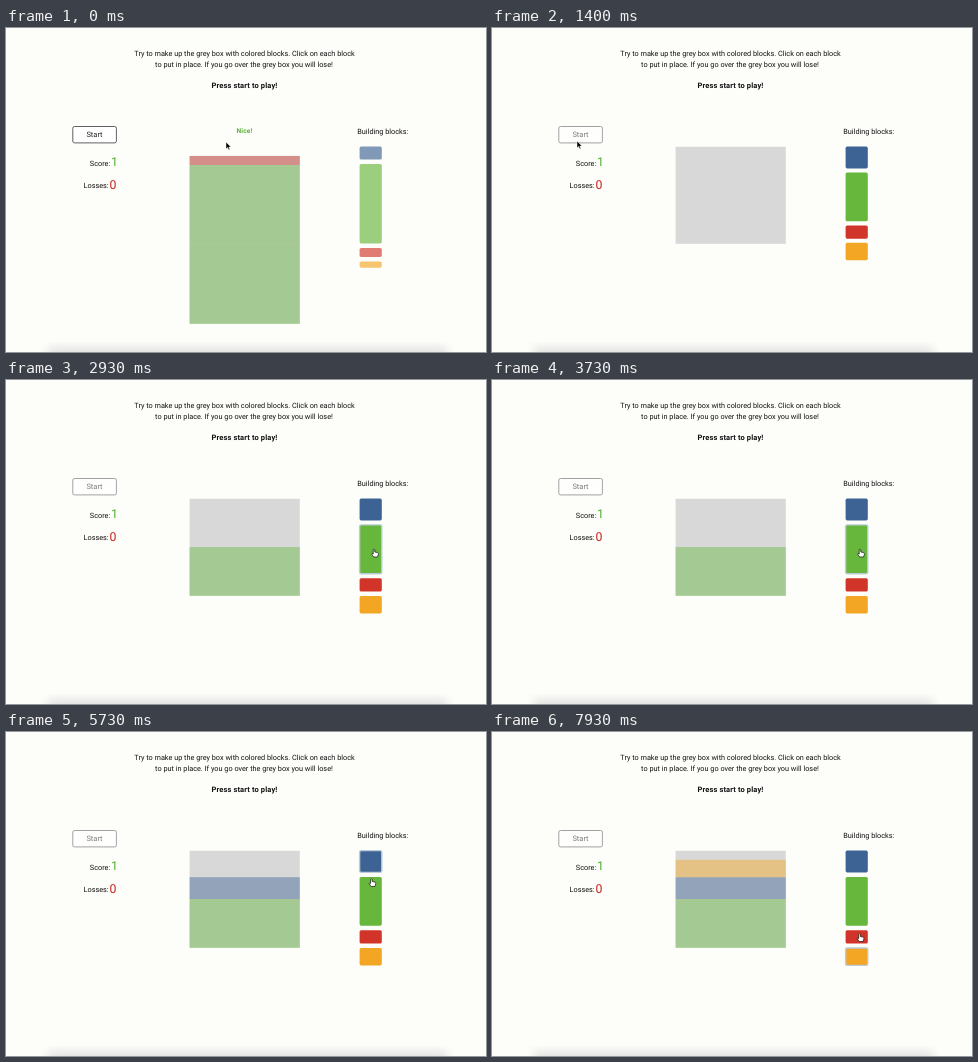
Recreate the animation shown at these times as an HTML page. Size 480x324 px, loop 8000 ms.

```html
<!DOCTYPE html>
<html lang="en">
<head>
<meta charset="utf-8">
<title>Building blocks</title>
<style>
  html, body { margin: 0; height: 100%; overflow: hidden; background: #fdfefa; }
  svg { display: block; width: 480px; height: 324px; }
  text { font: 7.3px Roboto, sans-serif; fill: #111; text-rendering: geometricPrecision; }
  .mid { text-anchor: middle; }
  .end { text-anchor: end; }
  .bold { font-weight: 700; font-size: 7.5px; letter-spacing: .13px; }
  .count { font-size: 12.3px; }
</style>
</head>
<body>
<svg viewBox="0 0 480 324">
  <defs>
    <linearGradient id="shade" x2="0" y2="1">
      <stop stop-color="#e6e6e4" stop-opacity="0"/>
      <stop offset="1" stop-color="#e6e6e4"/>
    </linearGradient>
    <filter id="soft" x="-5%" width="110%" y="0" height="1"><feGaussianBlur stdDeviation="5 0"/></filter>
  </defs>
  <rect x="42" y="313" width="399" height="11" fill="url(#shade)" filter="url(#soft)"/>

  <text class="mid" x="238.5" y="28.3">Try to make up the grey box with colored blocks. Click on each block</text>
  <text class="mid" x="238" y="38.8">to put in place. If you go over the grey box you will lose!</text>
  <text class="mid bold" x="238.5" y="60">Press start to play!</text>
  <text class="mid bold" x="238.5" y="105.3" id="praise" style="fill:#5cb035;font-size:6.6px">Nice!</text>

  <g id="start">
    <rect x="66.8" y="98.5" width="43.6" height="16.4" rx="1.8" stroke="#343a40" stroke-width=".8"/>
    <text class="mid" x="88.5" y="109.2" style="font-size:7.5px">Start</text>
  </g>
  <text class="end" x="104.2" y="137.5">Score:</text>
  <text class="count" x="105" y="138.3" style="fill:#4eae33">1</text>
  <text class="end" x="102.6" y="160.4">Losses:</text>
  <text class="count" x="103.6" y="161" style="fill:#c6221f">0</text>
  <text x="351.3" y="106.2">Building blocks:</text>

  <rect id="box" x="183.6" width="110.2" fill="#d8d8d8"/>
  <g id="fills" fill-opacity=".45"></g>
  <g id="blocks"></g>

  <circle id="ring" r="13.3" fill="none" stroke="#222" stroke-width=".9"/>
  <path id="arrow" d="M0 0V7L1.6 5.5L2.7 8L3.9 7.5L2.8 5.1H5Z" fill="#000" stroke="#fff" stroke-width=".5"/>
  <path id="hand" d="M-.8 .6Q0 -.5 .8 .6V3L3.6 3.6Q4.6 4 4.4 5.2L3.6 8H-.2L-2.4 5.2Q-2.4 4.2 -.8 5Z" fill="#fff" stroke="#111" stroke-width=".7"/>
</svg>
<script>
const LOOP = 8000, RESET = 1070, SETTLE = 1800;
const $ = id => document.getElementById(id);
const set = (el, attrs) => { for (const k in attrs) el.setAttribute(k, attrs[k]); };
const show = (el, on) => set(el, { visibility: on ? "visible" : "hidden" });
const addRect = (parent, attrs) => {
  const el = document.createElementNS("http://www.w3.org/2000/svg", "rect");
  set(el, attrs);
  return parent.appendChild(el);
};

// Heights of each block before and after pressing Start
const blocks = [
  { color: "#3c6394", heights: [12.9, 21.8] },
  { color: "#67b73d", heights: [79.4, 48.8] },
  { color: "#d1352a", heights: [9, 13.3] },
  { color: "#f2a623", heights: [6.3, 17.4] }
];
const [BLUE, GREEN, RED, ORANGE] = [0, 1, 2, 3];
for (const b of blocks)
  b.el = addRect($("blocks"), { x: 353.6, width: 22.2, rx: 1.6, fill: b.color });

const layers = [0, 1, 2].map(() => addRect($("fills"), { x: 183.6, width: 110.2 }));

// Pointer stops: time, x, y
const path = [
  [70, 220, 114], [430, 150, 126], [870, 85, 113], [1470, 85, 113],
  [1730, 234, 137], [2070, 296.7, 164.5], [2600, 368, 169], [3730, 368, 169],
  [3930, 367, 166], [4570, 367, 166], [4930, 365, 135], [5560, 365, 135],
  [6330, 368, 226], [7220, 368, 226], [7470, 368, 206], [7640, 368, 206],
  [7930, 367.5, 201.5]
];
// Press times and the block each one adds
const presses = [[930], [2670, GREEN], [5070, BLUE], [6730, ORANGE]];
const HOLD = 140;

const clamp = v => Math.min(1, Math.max(0, v));
const smooth = v => v * v * (3 - 2 * v);

function pointerAt(t) {
  const i = path.findIndex(p => p[0] > t);
  if (i === 0) return path[0].slice(1);
  if (i < 0) return path[path.length - 1].slice(1);
  const [a, b] = [path[i - 1], path[i]];
  const k = smooth((t - a[0]) / (b[0] - a[0]));
  return [a[1] + (b[1] - a[1]) * k, a[2] + (b[2] - a[2]) * k];
}

function draw(t) {
  const playing = t >= RESET;
  const added = presses.filter(p => p.length > 1 && t >= p[0] + HOLD).map(p => p[1]);
  const focused = added[added.length - 1];
  const [x, y] = pointerAt(t);

  const grow = smooth(clamp((t - RESET) / 150));
  const gap = playing && t < SETTLE ? 4.1 : 4.5;
  let top = 118.6;
  blocks.forEach((b, i) => {
    const height = b.heights[0] + (b.heights[1] - b.heights[0]) * grow;
    set(b.el, {
      y: top, height, opacity: .65 + .35 * grow,
      stroke: i === focused ? "#bccbd8" : "none", "stroke-width": 1.4
    });
    top += height + gap;
  });

  const stack = playing ? added : [GREEN, GREEN, RED];
  let base = playing ? 215.8 : 295.8;
  const boxTop = playing ? 118.8 : 127.8;
  set($("box"), { y: boxTop, height: base - boxTop });
  layers.forEach((el, i) => {
    const block = blocks[stack[i]];
    show(el, block);
    if (!block) return;
    const height = block.heights[+playing];
    base -= height;
    set(el, { y: base, height, fill: block.color });
  });

  const hover = !playing && x < 110 && y > 98 && y < 115;
  const [face, label] = $("start").children;
  set($("start"), { opacity: playing ? .58 : 1 });
  set(face, { fill: hover ? "#343a40" : "#fff" });
  label.style.fill = hover ? "#fff" : "#222";
  show($("praise"), !playing);

  const press = presses.find(p => t >= p[0] && t < p[0] + 220);
  show($("ring"), press);
  if (press) set($("ring"), { cx: x, cy: y, opacity: 1 - clamp((t - press[0] - HOLD) / 80) });

  const pointing = hover || x > 353;
  show($("hand"), pointing);
  show($("arrow"), !pointing);
  set($(pointing ? "hand" : "arrow"), { transform: `translate(${x} ${y})` });
}

function tick() {
  draw(performance.now() % LOOP);
  requestAnimationFrame(tick);
}
tick();
</script>
</body>
</html>
```
